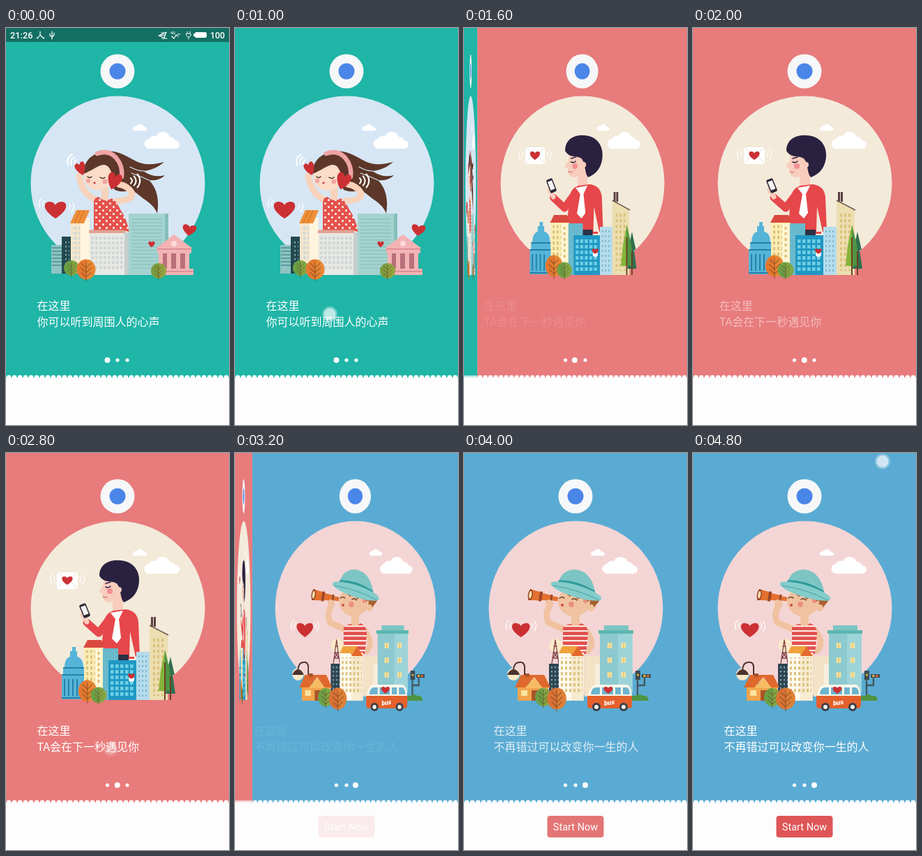
These frames come from a looping animation (320 px wide and 569 px high, 5 s). An HTML page:

```html
<!DOCTYPE html>
<html lang="zh">
<head>
<meta charset="utf-8">
<title>Onboarding</title>
<style>
html, body { margin: 0; width: 100%; height: 100%; overflow: hidden; background: #fdfdfd; }
svg { display: block; width: 100vw; height: 100vh; }
text { fill: #fff; }
.cap { font: 16px "Noto Sans CJK SC", "Noto Sans CJK", sans-serif; }
.ui { font-family: Roboto, sans-serif; }
.line { fill: none; stroke-linecap: round; stroke-linejoin: round; }
.white { stroke: #fff; }
.skin { stroke: #f9d2bb; }
.tan { stroke: #f0c2a0; }
</style>
</head>
<body>
<svg viewBox="0 0 320 569" preserveAspectRatio="none">
<defs>
  <pattern id="scallop" width="8" height="8" y="497" patternUnits="userSpaceOnUse"><circle cx="4" cy="4" r="3.4" fill="#fdfdfd"/></pattern>
  <pattern id="polka" width="10" height="10" x="127" y="249" patternUnits="userSpaceOnUse"><rect width="10" height="10" fill="#e5524c"/><circle cx="2.5" cy="2.5" r="1.5" fill="#fff"/><circle cx="7.5" cy="7.5" r="1.5" fill="#fff"/></pattern>
  <pattern id="stripes" width="10" height="7" y="247" patternUnits="userSpaceOnUse"><rect width="10" height="7" fill="#e2504e"/><rect width="10" height="2.2" fill="#fbe9e4"/></pattern>
  <pattern id="grey" width="6" height="7" x="122" y="299" patternUnits="userSpaceOnUse"><rect width="3.6" height="4.4" fill="#cfd8d6"/></pattern>
  <pattern id="slats" width="10" height="5" y="273" patternUnits="userSpaceOnUse"><rect width="10" height="1.8" fill="#91c6c2"/></pattern>
  <pattern id="amber" width="6" height="8" x="1" y="2" patternUnits="userSpaceOnUse"><rect width="3" height="4.5" fill="#dcc27c"/></pattern>
  <pattern id="sky" width="7" height="8" x="150" y="303" patternUnits="userSpaceOnUse"><rect width="4.5" height="5" fill="#6ed0e6"/></pattern>
  <pattern id="lit" width="5" height="6" patternUnits="userSpaceOnUse"><rect width="2" height="2.5" fill="#79a9a8"/></pattern>

  <path id="heart" d="M0 12C-22-2-16-13-8-12C-3-12 0-8 0-7C0-8 3-12 8-12C16-13 22-2 0 12Z" fill="#cb3033"/>
  <g id="waves" class="line white" stroke-width="2.2"><path d="M0-4q4 4 0 8M5-7q6 7 0 14M10-10q8 10 0 20"/></g>
  <g id="ripple" class="line white" stroke-width="1.2"><path d="M0-4q3 4 0 8M4-7q5 7 0 14"/></g>
  <g id="tree">
    <circle r="12" fill="currentColor"/>
    <path d="M0-12a12 12 0 0 1 0 24z" fill="#ffd24a" opacity=".16"/>
    <path class="line" d="M0-9V14M0-2l6-5M0-2l-6-5M0 4l7-6M0 4l-7-6M0 9l6-5M0 9l-6-5" stroke="#6b3f22" stroke-opacity=".6"/>
  </g>
  <path id="cloud" d="M-19 12a7 7 0 0 1-1-14a8 8 0 0 1 10-4a11 11 0 0 1 20 1a9 9 0 0 1 8 5a6 6 0 0 1 0 12Z" fill="#fff"/>
  <g id="top">
    <rect y="497" width="320" height="5" fill="url(#scallop)"/>
    <circle cx="160" cy="62" r="24.5" fill="#f6f7f8"/>
    <circle cx="160" cy="62" r="11.5" fill="#4a86e8"/>
  </g>
  <g id="clouds">
    <use href="#cloud" x="225" y="161"/>
    <use href="#cloud" transform="translate(192.6 142.4) scale(.4)"/>
  </g>
</defs>

<g class="page">
  <rect width="320" height="501" fill="#1fb5a7"/>
  <use href="#top"/>
  <circle cx="160.5" cy="222.500" r="125" fill="#d6e6f4"/>
  <use href="#clouds"/>
  <!-- girl -->
  <path fill="#5d3729" d="M130 182C148 170 167 180 181 188C198 198 212 196 227 192C219 199 209 204 197 205C207 212 218 214 228 211C221 218 212 219 205 218C217 230 220 246 217 266C212 252 199 247 189 238C180 229 170 238 156 232Z"/>
  <path class="line" stroke="#d6e6f4" stroke-width="1.2" d="M178 199Q188 205 198 205M180 208Q192 212 205 218"/>
  <path class="line skin" stroke-width="9" d="M131 247Q110 240 105 212M158 248Q182 247 181 237Q175 226 162 224"/>
  <path class="line skin" stroke-width="10" d="M142 230V246"/>
  <ellipse cx="133" cy="213" rx="21" ry="20" fill="#fbdcc8"/>
  <path fill="#5d3729" d="M111 209C111 189 127 176 147 178C164 183 168 205 159 224C152 218 154 208 147 199C138 190 128 203 111 209Z"/>
  <path class="line" stroke="#efa4a6" stroke-width="6.5" d="M131 180Q147 174 158 186Q168 198 166 213"/>
  <path class="line" stroke="#4b2b22" stroke-width="1.4" d="M117 213q3 3 6 0M135 214q4 3 7 0"/>
  <g fill="#f4a6a0"><circle cx="118" cy="219" r="3.2"/><circle cx="142" cy="220" r="3.6"/></g>
  <circle cx="127" cy="222" r="1.5" fill="#cb3033"/>
  <use href="#heart" transform="translate(107.500 202) rotate(-20) scale(.48 .8)"/>
  <use href="#heart" transform="translate(155 220) rotate(18) scale(.66 1)"/>
  <path fill="url(#polka)" d="M126 252Q126 242 133 242Q142 251 152 244Q159 249 164 260Q173 273 177 292H126Z"/>
  <use href="#waves" transform="translate(100 192) rotate(200) scale(.85)"/>
  <use href="#waves" transform="translate(179 219) scale(.95)"/>
  <use href="#heart" x="71" y="261"/>
  <use href="#ripple" transform="translate(54 251) rotate(195)"/>
  <use href="#ripple" transform="translate(91 256) rotate(8)"/>
  <!-- city -->
  <rect x="65" y="311" width="16" height="41" fill="#8fc4c1"/>
  <path stroke="#4c8f96" stroke-width="1.4" d="M66 315h14m-14 5h14m-14 5h14m-14 5h14m-14 5h14m-14 5h14"/>
  <rect x="80" y="299" width="13" height="53" fill="#234850"/>
  <rect x="82" y="303" width="9" height="42" fill="url(#lit)"/>
  <rect x="93" y="279" width="27" height="73" fill="#f6e6cb"/>
  <rect x="107" y="272" width="13" height="80" fill="#fff4de"/>
  <path fill="#ee8f38" d="M92 280L101 261H120L112 280Z"/>
  <path stroke="#c96f25" d="M98 279l8-17m-2 17l8-17"/>
  <rect x="95" y="285" width="11" height="48" fill="url(#grey)"/>
  <rect x="120" y="291" width="54" height="63" fill="#e8e8e4"/>
  <rect x="119" y="289.500" width="52" height="4.500" fill="#e0a391"/>
  <rect x="122" y="299" width="46" height="49" fill="url(#grey)"/>
  <rect x="170" y="293" width="6" height="61" fill="#c5cecb"/>
  <rect x="176" y="266" width="57" height="88" fill="#a5d3cf"/>
  <rect x="180" y="273" width="44" height="74" fill="url(#slats)"/>
  <rect x="228" y="266" width="5" height="88" fill="#85bfbb"/>
  <g fill="#f3b3b4">
    <path d="M215 316L241 296L268 316Z"/>
    <path d="M217 317h49v6h-49zM219 323h6v22h-6zM231 323h6v22h-6zM244 323h6v22h-6zM257 323h6v22h-6zM213 345h56v9h-56z"/>
  </g>
  <path fill="#b9707a" d="M225 323h6v22h-6zM237 323h7v22h-7zM250 323h7v22h-7z"/>
  <path fill="#d9868b" d="M213 348h56v1.5h-56zM217 316h49v1.500h-49z"/>
  <circle cx="241" cy="309" r="4" fill="#fbdada"/>
  <use href="#heart" transform="translate(263 290) rotate(8) scale(.65)"/>
  <use href="#heart" transform="translate(209 310) scale(.3 .36)"/>
  <use href="#tree" transform="translate(94 344) scale(.92)" color="#6ba045"/>
  <use href="#tree" transform="translate(115 346) scale(1.12 1.2)" color="#e4782f"/>
  <use href="#tree" transform="translate(219 348) scale(.92)" color="#7d9c3f"/>
</g>

<g class="page">
  <rect width="320" height="501" fill="#e87b7c"/>
  <use href="#top"/>
  <circle cx="160.5" cy="222.500" r="125" fill="#f3eada"/>
  <use href="#clouds"/>
  <rect x="73" y="171" width="30" height="24" fill="#fff"/>
  <path class="line" stroke="#e6e0da" d="M73 171l15 12l15-12M73 195l11-13M103 195l-11-13"/>
  <use href="#heart" transform="translate(88 183) scale(.5)"/>
  <use href="#ripple" transform="translate(70 181) rotate(180)"/>
  <use href="#ripple" transform="translate(106 181)"/>
  <!-- man -->
  <path fill="#f8cdbd" d="M141 178L139 190L133 199L138 201Q138 214 148 214L153 213V232H168V186Z"/>
  <path fill="#2a2140" d="M134 176C134 158 150 152 165 154C184 156 192 170 191 184C190 201 180 210 169 214C163 207 166 195 159 187C150 182 141 187 134 176Z"/>
  <circle cx="162" cy="196" r="4" fill="#f8cdbd"/>
  <circle cx="149" cy="198" r="4" fill="#f28f93"/>
  <path class="line" stroke="#2a2140" stroke-width="1.4" d="M143 187l7-2M143 192q4 2 7-1"/>
  <path class="line" stroke="#c9515a" d="M139 206q4 2 6 0"/>
  <path fill="#e6474a" d="M136 295L140 244Q142 230 154 226L172 224Q188 226 190 242L192 292H184V295Z"/>
  <path class="line" stroke="#e6474a" stroke-width="11" d="M145 242L133 258L116 243"/>
  <path class="line" stroke="#f8cdbd" stroke-width="7" d="M116 242L110 232"/>
  <path fill="#f3eada" d="M178 256L186 292H177Z"/>
  <path fill="#fff" d="M150 229L168 226L162 238L165 265L159 273L152 266L157 238Z"/>
  <g transform="rotate(-22 113 226)"><rect x="108" y="216" width="10" height="20" rx="2" fill="#2b2834"/><rect x="109.5" y="219" width="7" height="13" fill="#f4f4f4"/></g>
  <rect x="160" y="289" width="16" height="10" fill="#2c3146"/>
  <!-- city -->
  <g fill="#55b4d8"><path d="M84 307Q84 291 97 291Q111 291 111 307ZM92 284h10v8h-10zM95 278h5v6h-5zM82 307h30v10h-30zM80 317h34v36h-34z"/></g>
  <path stroke="#2580a8" stroke-width="2" d="M80 318h34M82 308h30M84 324v24m6-24v24m6-24v24m6-24v24M80 351h34"/>
  <rect x="112" y="278" width="28" height="76" fill="#fbecb4"/>
  <path fill="#d9493f" d="M111 279l6-11h20l4 11z"/>
  <rect x="114" y="283" width="24" height="48" fill="url(#amber)"/>
  <rect x="128" y="281" width="10" height="55" fill="#fff6d6"/>
  <path stroke="#e3bd72" stroke-width="3" stroke-dasharray="4 4" d="M133 285v46"/>
  <rect x="139" y="280" width="22" height="74" fill="#69b9cc"/>
  <rect x="187" y="285" width="20" height="69" fill="#b6dceb"/>
  <path stroke="#7ab9d3" stroke-width="2" stroke-dasharray="3 4" d="M191 290v60m5-60v60m5-60v60"/>
  <rect x="147" y="297" width="40" height="57" fill="#2098c4"/>
  <rect x="150" y="303" width="35" height="48" fill="url(#sky)"/>
  <path fill="#5b3d43" d="M208 235h3v14h-3zM212 235h3v14h-3z"/>
  <path fill="#ecdeb0" d="M206 247L232 260V354H206Z"/>
  <path stroke="#6d5a52" stroke-width="1.5" d="M206 247L233 261"/>
  <rect x="209" y="266" width="18" height="82" fill="url(#amber)"/>
  <path fill="#2f6f50" d="M236 292L242 318H239L243 345H229L233 318H230Z"/>
  <path fill="#83b53b" d="M228 282L235 312L237 341H219L222 312Z"/>
  <path fill="#4f9443" d="M228 282L235 312L237 341H228Z"/>
  <path stroke="#6b3f22" stroke-width="2" d="M228 300v54M236 320v34"/>
  <circle cx="180" cy="324" r="4" fill="#fff"/>
  <use href="#heart" transform="translate(180 320) scale(.32)"/>
  <use href="#tree" transform="translate(117 341) scale(1.1 1.3)" color="#e4782f"/>
  <use href="#tree" transform="translate(133 347) scale(.95)" color="#6ba045"/>
</g>

<g class="page">
  <rect width="320" height="501" fill="#5aabd3"/>
  <use href="#top"/>
  <circle cx="160.5" cy="222.500" r="125" fill="#f4d5d5"/>
  <use href="#clouds"/>
  <use href="#heart" transform="translate(81.700 254) scale(.84)"/>
  <use href="#ripple" transform="translate(67 247) rotate(190)"/>
  <use href="#ripple" transform="translate(97 248)"/>
  <!-- boy -->
  <path class="line tan" stroke-width="9" d="M124 217Q115 230 121 243L147 254"/>
  <path class="line tan" stroke-width="12" d="M160 228V248"/>
  <path class="line tan" stroke-width="8" d="M174 253Q190 271 178 284"/>
  <path fill="#a9602e" d="M140 196L192 204Q197 212 190 217Q185 226 176 224Z"/>
  <ellipse cx="158" cy="213" rx="23" ry="21" fill="#f0c2a0"/>
  <path fill="#a9602e" d="M141 196L193 208L187 222L180 211L175 215L169 206L163 210L158 202L152 206Z"/>
  <circle cx="182" cy="222" r="5" fill="#f0c2a0"/>
  <g fill="#ea8f82"><circle cx="154" cy="217" r="4"/><circle cx="174" cy="212" r="3"/></g>
  <path class="line" stroke="#6a3b22" stroke-width="1.4" d="M137 208q4-3 7 0M155 210q4-3 7 1"/>
  <circle cx="141" cy="218" r="2" fill="#d0463e"/>
  <path fill="#7cc5c4" d="M135 190Q138 167 160 167Q185 170 189 205Z"/>
  <path fill="#2f9a9a" d="M136 182Q162 182 187 197L189 204L134 189Z"/>
  <ellipse cx="161" cy="198" rx="38" ry="8.500" fill="#84cccb" transform="rotate(17 161 198)"/>
  <path class="line" stroke="#459f9f" d="M128 190Q162 195 194 211"/>
  <g transform="rotate(9 113 206)">
    <path fill="#e4702f" d="M93 198L110 200V212L93 214ZM111 201L126 202V210L111 211ZM127 203H135V209H127Z"/>
    <rect x="108" y="199" width="4" height="14" fill="#9c4524"/><rect x="124" y="201" width="3" height="10" fill="#9c4524"/>
    <ellipse cx="95" cy="206" rx="3.4" ry="8" fill="#8d3f22"/><ellipse cx="95" cy="206" rx="2" ry="5.5" fill="#f8dcae"/>
  </g>
  <circle cx="122" cy="215" r="5" fill="#f0c2a0"/>
  <path fill="url(#stripes)" d="M142 250Q146 246 153 245Q160 251 168 244Q178 247 178 260L175 288H142Z"/>
  <!-- city -->
  <g fill="#fbe9c8"><circle cx="71" cy="317" r="9"/><circle cx="132" cy="276" r="10"/></g>
  <path class="line" stroke="#4a3230" stroke-width="2" d="M87 342V306Q86 299 79 300Q72 300 71 311"/>
  <path fill="#4a3230" d="M62 318Q66 310 71 310Q77 310 80 318Z"/>
  <path class="line" stroke="#7c3f44" stroke-width="1.3" d="M131 268L126 302M131 268L136 302M128 286h6M127 294h8M129 277h4M128 286l7 8M134 286l-7 8"/>
  <rect x="122" y="302" width="17" height="46" fill="#2f4453"/>
  <rect x="124" y="305" width="12" height="37" fill="url(#lit)"/>
  <rect x="173" y="291" width="23" height="58" fill="#f3e2c6"/>
  <rect x="188" y="302" width="10" height="46" fill="#f7eedd"/>
  <rect x="136" y="286" width="36" height="69" fill="#fffaf0"/>
  <rect x="154" y="291" width="18" height="64" fill="#f7ebd1"/>
  <path fill="#f0a13b" d="M136 287l5-10h22l9 14h-16l-4-4z"/>
  <path fill="#e4692d" d="M154 291l9-14l9 14z"/>
  <rect x="139" y="293" width="31" height="52" fill="url(#amber)"/>
  <rect x="195" y="257" width="47" height="86" fill="#8cc9d0"/>
  <rect x="221" y="257" width="21" height="86" fill="#9dd4da"/>
  <path fill="#5cb7b0" d="M193 254h50v5h-50z"/>
  <path fill="#7cc5c4" d="M201 247h35v7h-35z"/>
  <path stroke="#f4e3a0" stroke-width="6.500" stroke-dasharray="8 13" d="M209 272v60M229 272v60"/>
  <path stroke="#d9b45c" stroke-dasharray="8 13" d="M209 272v60M229 272v60"/>
  <rect x="77" y="331" width="44" height="24" fill="#f2a44c"/>
  <path fill="#df692c" d="M73 336L82 318H115L124 336H112L101 321L88 336Z"/>
  <path fill="#f7bb62" d="M88 337L101 322L113 337Z"/>
  <path fill="#fbe3a0" d="M82 340h9v8h-9zM110 340h8v8h-8z"/>
  <path fill="#a9542a" d="M97 340h9v15h-9zM88 316h6v5h-6z"/>
  <path class="line" stroke="#435860" stroke-width="2.4" d="M249 314V350M249 333H259V322"/>
  <path fill="#3d4c50" d="M246 312h7v13h-7zM255 317h13v5h-13z"/>
  <g fill="#f0b33e"><circle cx="249.500" cy="318" r="1.6"/><circle cx="259" cy="319.500" r="1.8"/></g>
  <circle cx="264" cy="319.500" r="1.8" fill="#e4692d"/>
  <path fill="#4f9443" d="M238 355q1-9 9-7q5-4 9 0q8-2 9 7z"/>
  <use href="#tree" transform="translate(114 350) scale(1 1.1)" color="#6ba045"/>
  <use href="#tree" transform="translate(133 352) scale(1.15 1.3)" color="#d97134"/>
  <path fill="#fff7ea" d="M177 353Q179 333 189 332H233Q241 333 241 353Z"/>
  <path fill="#e4602c" d="M177 348H241V361Q241 366 237 366H181Q177 366 177 361Z"/>
  <path fill="#6cb4cf" d="M182 346Q183 336 189 336H195V346ZM198 336H214V346H198ZM217 336H225V346H217ZM228 336H234Q238 338 238 346H228Z"/>
  <use href="#heart" transform="translate(207 340) scale(.42)"/>
  <g fill="#3b3f49"><circle cx="190" cy="364" r="6"/><circle cx="229" cy="364" r="6"/></g>
  <g fill="#f4efe6"><circle cx="190" cy="364" r="3"/><circle cx="229" cy="364" r="3"/></g>
  <text class="ui" x="201" y="361" font-size="9.500" font-weight="900" font-style="italic" transform="rotate(-8 208 358)">bus</text>
</g>

<g class="cap"><text y="403.500">在这里</text><text y="427">你可以听到周围人的心声</text></g>
<g class="cap"><text y="403.500">在这里</text><text y="427">TA会在下一秒遇见你</text></g>
<g class="cap"><text y="403.500">在这里</text><text y="427">不再错过可以改变你一生的人</text></g>

<g fill="#fff"><circle cx="145.500" cy="476" r="2.600"/><circle cx="160" cy="476" r="2.600"/><circle cx="174" cy="476" r="2.600"/><circle id="dot" cy="476" r="4"/></g>

<g id="start">
  <rect x="119.500" y="520" width="81" height="31" rx="4" fill="#df5657"/>
  <text class="ui" x="160" y="541" font-size="14.500" text-anchor="middle">Start Now</text>
</g>

<g id="bar">
  <rect width="320" height="20" fill="#136f63"/>
  <g class="ui" font-size="12.800" font-weight="500"><text x="6" y="14.500">21:26</text><text x="293" y="14.500" font-size="12.300">100</text><text x="236" y="9" font-size="5.500">4G</text></g>
  <g class="line white" stroke-width="1.200">
    <path d="M49 5v5l-4 5M49 10l5 5M44 14h2M53 14h2M66 5v11M63 8v3l3 2l3-3v-3M219 11l11-5l-3 8zM219 11l9-1M223 7h6M224 15h7M238 12l3 3l3-5l3 2M246 9h4"/>
    <path stroke-width=".9" d="M259 8h6v3q-3 4-6 0zM260 5v3M264 5v3M262 13v3"/>
  </g>
  <rect x="271" y="6" width="17" height="8" rx="2" fill="#fff"/><rect x="269" y="8" width="2" height="4" fill="#fff"/>
</g>

<g id="touch"><circle r="11" fill="#fff" opacity=".35"/><circle r="8.500" fill="#fff" opacity=".75"/></g>
</svg>
<script>
const LOOP = 5000, TICK = 200;
const $ = id => document.getElementById(id);
const pages = document.querySelectorAll('.page');
const captions = document.querySelectorAll('svg > .cap');
const clamp = v => Math.min(1, Math.max(0, v));

// each row: time, then values
const scroll = [[1000, 0], [1200, .16], [1400, .6875], [1600, .94], [1800, .993], [2000, 1],
  [2800, 1], [3000, 1.32], [3200, 1.922], [3400, 1.985], [3600, 1.997], [3800, 2]];
const taps = [[800, 136, 410, 0], [1000, 136, 410, .85], [1200, 95, 406, .7], [1400, 54, 403, .22], [1600, 40, 402, 0],
  [2600, 150, 424, 0], [2800, 150, 424, .35], [3000, 95, 421, .5], [3200, 50, 420, 0],
  [4600, 272, 12, 0], [4800, 272, 12, .85]];
const barSlide = [[200, 0], [400, -5], [600, -21]];

function track(rows, t) {
  const i = rows.findIndex(r => r[0] > t);
  if (i < 0) return rows[rows.length - 1].slice(1);
  if (i === 0) return rows[0].slice(1);
  const a = rows[i - 1], b = rows[i], k = (t - a[0]) / (b[0] - a[0]);
  return a.slice(1).map((v, j) => v + (b[j + 1] - v) * k);
}

// when each caption begins to enter: a decelerating slide with a linear fade
const entries = [-LOOP, 1460, 3115];
const slide = t => 1 - (1 - clamp(t / 1290)) ** 2;
const fade = t => clamp((t + 20) / 1120);

function draw(t) {
  const [pos] = track(scroll, t);
  pages.forEach((page, i) => {
    const off = i - pos, width = 1 - Math.abs(off);
    page.style.display = width > 0 ? '' : 'none';
    page.setAttribute('transform', `translate(${Math.max(0, off) * 320}) scale(${width} 1)`);
  });

  captions.forEach((cap, i) => {
    const age = t - entries[i];
    cap.setAttribute('transform', `translate(${24.5 + 20 * slide(age)})`);
    cap.setAttribute('opacity', fade(age) * clamp(1 - 2.5 * (pos - i)));
  });
  $('start').setAttribute('opacity', fade(t - entries[2]));
  $('dot').setAttribute('cx', 145.5 + 14.25 * pos);
  $('bar').setAttribute('transform', `translate(0 ${track(barSlide, t)[0]})`);

  const [x, y, alpha] = track(taps, t);
  $('touch').setAttribute('transform', `translate(${x} ${y})`);
  $('touch').setAttribute('opacity', alpha);
}

function frame() {
  const t = (performance.now() + 10) % LOOP;
  draw(Math.floor(t / TICK) * TICK);
  requestAnimationFrame(frame);
}
frame();
</script>
</body>
</html>
```
